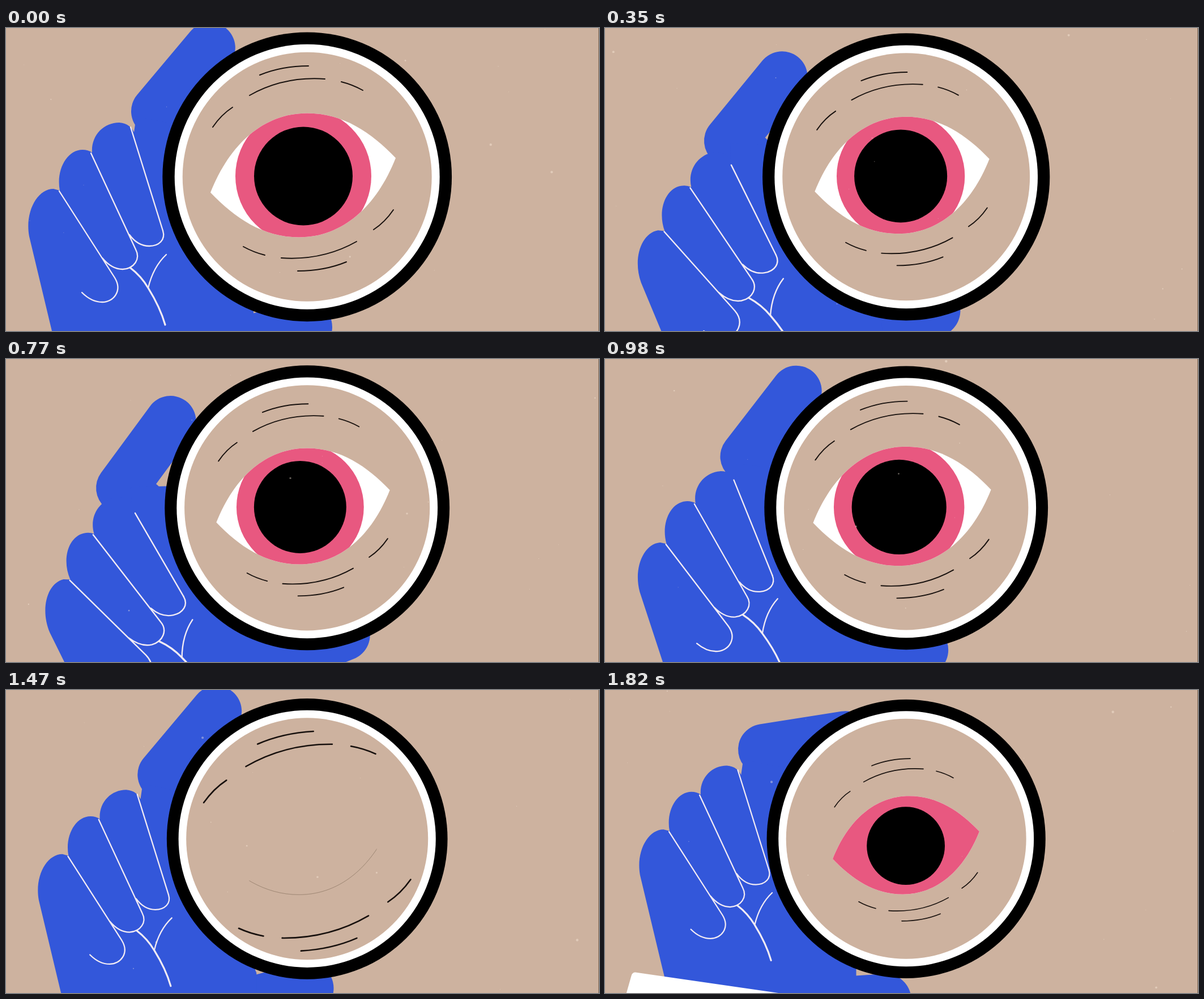
An HTML page with a canvas for the animation above (1890 ms loop, 1047 by 535 pixels).

```html
<!DOCTYPE html>
<html lang="en">
<head>
<meta charset="utf-8">
<title>Eye behind a magnifying glass</title>
<style>
  html, body { margin: 0; width: 100%; height: 100%; overflow: hidden; background: #cdb29f; }
  canvas { display: block; }
</style>
</head>
<body>
<canvas id="stage" width="1047" height="535"></canvas>
<script>
const ctx = document.getElementById('stage').getContext('2d');
const LOOP = 1890, STEP = 70, LAST = LOOP - STEP;
const TAN = '#cdb29f', BLUE = '#3357da', PINK = '#e85880', CREASE = '#f3ecf4';

const PALM = new Path2D(`M81 535L41 368C33 325 55 284 84 284L95 287C88 250 108 215 135 215
  Q145 215 152 220C150 190 172 167 200 167C215 168 222 176 226 184L230 156L300 170L437 500V800H146Z`);
const SLEEVE = new Path2D('M0 640L25 552Q27 545 34 546L400 599V800H0Z');
const FINGER_LINES = new Path2D(`M94 288L192 441C206 464 190 484 170 484C155 484 144 477 134 467
  M150 221L229 391C238 408 226 425 206 426C192 426 180 418 170 406
  M277 358C282 374 270 385 253 385C238 385 226 376 218 365
  M251 459C256 438 266 416 283 400`);
const PALM_LINE = new Path2D('M219 423C232 433 244 447 251 459C264 480 275 503 281 524');

// Eye and wrinkles look the same after half a turn, so only the upper half is given.
const LID = [[-163.5, 30.5], [-129.5, -55.5], [-69.5, -109.5], [7.5, -109.5],
  [70.5, -109.5], [120.5, -75.5], [163.5, -30.5]];
const WRINKLES = new Path2D(`M-76.5-165Q-37.5-181 9.5-181M-94.5-129Q-34.5-163 38.5-158
  M67.5-153Q87.5-148 105.5-138M-159.5-73Q-144.5-95-124.5-108`);

const mix = (a, b, k) => a + (b - a) * k;
const progress = (t, from, to) => Math.min(1, Math.max(0, (t - from) / (to - from)));
const ease = (t, from, to) => { const k = progress(t, from, to); return k * k * (3 - 2 * k); };
const arch = (t, from, to) => Math.max(0, Math.sin(Math.PI * progress(t, from, to)));
const radians = degrees => degrees * Math.PI / 180;

function rotated(x, y, degrees) {
  const c = Math.cos(radians(degrees)), s = Math.sin(radians(degrees));
  return [x * c - y * s, x * s + y * c];
}

function disc(x, y, r, color) {
  ctx.fillStyle = color;
  ctx.beginPath();
  ctx.arc(x, y, r, 0, 2 * Math.PI);
  ctx.fill();
}

function polyline(points, width, color) {
  ctx.strokeStyle = color;
  ctx.lineWidth = width;
  ctx.beginPath();
  points.forEach(p => ctx.lineTo(...p));
  ctx.stroke();
}

// The hand dips and turns around its palm, then lifts at the end.
function drawHand(t, zoom) {
  const turn = 15.6 * arch(t, 0, 1220) ** 2.2;
  const lift = ease(t, 1540, LAST);
  const x = 232 + 14 * t / LAST + 3.1 * turn;
  const y = 400 + 3 * t / LAST + 5.5 * turn - 45 * lift;
  const scale = zoom * (1 + .004 * turn);
  ctx.lineCap = ctx.lineJoin = 'round';

  const [kx, ky] = rotated(34, -253, -1.9 * turn);
  const knuckle = [x + kx, y + ky];
  const lean = 50 - 10 * arch(t, 0, 420) ** 2 + 4 * arch(t, 0, 1220) - 41 * lift;
  const [dx, dy] = rotated(146, 0, -lean);
  const tip = [knuckle[0] + dx, knuckle[1] + dy];
  const base = [knuckle[0] + 35, knuckle[1] + 30];
  polyline([tip, knuckle, base], 90, BLUE);

  const [tx, ty] = rotated(298 * zoom, 128 * zoom, 14 * lift - 1.6 * turn);
  polyline([[437, 551], [x + tx, y + ty]], 92, BLUE);

  ctx.save();
  ctx.translate(x, y);
  ctx.rotate(radians(-turn));
  ctx.scale(scale, scale);
  ctx.translate(-232, -400);
  ctx.fillStyle = BLUE;
  ctx.fill(PALM);
  const trim = .011 * turn;
  polyline([[mix(220, 277, trim), mix(175, 358, trim)], [277, 358]], 2.3, CREASE);
  ctx.stroke(FINGER_LINES);
  ctx.lineWidth = 3.2;
  ctx.stroke(PALM_LINE);
  ctx.fillStyle = '#fff';
  ctx.fill(SLEEVE);
  ctx.restore();
}

function drawWrinkles(shut) {
  ctx.save();
  ctx.translate(7.5 * shut, mix(-12, 7, shut));
  ctx.transform(mix(1, 1.18, shut), -.065 * shut, 0, mix(1, 1.1, shut), 0, 0);
  ctx.strokeStyle = '#17100d';
  ctx.lineWidth = mix(2, 2.4, shut);
  ctx.stroke(WRINKLES);
  ctx.rotate(Math.PI);
  ctx.stroke(WRINKLES);
  ctx.restore();
}

// The upper lid closes onto the lower one.
function lidPath(shut) {
  const lower = LID.map(([x, y]) => [-x, -y - 5 * shut]);
  const upper = LID.map(([x, y], i) => [mix(x, lower[6 - i][0], shut), mix(y, lower[6 - i][1], shut)]);
  const path = new Path2D();
  path.moveTo(...upper[0]);
  for (const p of [upper, lower]) {
    path.bezierCurveTo(...p[1], ...p[2], ...p[3]);
    path.bezierCurveTo(...p[4], ...p[5], ...p[6]);
  }
  return path;
}

function drawEye(t, zoom) {
  const reopen = ease(t, 1470, LAST);
  const shut = ease(t, 1260, 1470) - reopen;
  const scale = zoom * (1 - .06 * arch(t, 0, 1100)) * (1 - .178 * reopen);
  const gaze = .5 - 6 * ease(t, 210, 490) + 10 * ease(t, 980, 1260) - 5 * reopen;

  ctx.save();
  ctx.translate(524.5 + 7 * reopen, 260 + 14 * reopen);
  ctx.scale(scale, scale);
  drawWrinkles(shut);
  const lids = lidPath(shut);
  if (shut < 1) {
    ctx.clip(lids);
    ctx.fillStyle = '#fff';
    ctx.fillRect(-200, -150, 400, 300);
    disc(gaze, 1.5, mix(120, 170, reopen), PINK);
    disc(gaze, 1.5, 87, '#000');
  } else {
    ctx.beginPath();
    ctx.rect(-98, 0, 232, 150);
    ctx.clip();
    ctx.strokeStyle = '#86705f';
    ctx.lineWidth = .4;
    ctx.stroke(lids);
  }
  ctx.restore();
}

// Film dust, new on every step
function drawDust(step) {
  let seed = step * 7919 + 17;
  const random = () => (seed = (seed * 16807) % 2147483647) / 2147483647;
  for (let i = 0; i < 5; i++) random();
  for (let i = 0; i < 18; i++) {
    disc(random() * 1047, random() * 535, .5 + 2 * random() ** 4, 'rgba(255,240,225,.4)');
  }
}

function draw(now) {
  const step = Math.floor((now % LOOP) / STEP), t = step * STEP;
  const zoom = 1 - .0365 * t / LAST;
  ctx.fillStyle = TAN;
  ctx.fillRect(0, 0, 1047, 535);
  drawHand(t, zoom);
  disc(531.7, 262.8, 255.4 * zoom, '#000');
  disc(531.7, 262.8, 234 * zoom, '#fff');
  disc(531.7, 262.8, 220 * zoom, TAN);
  drawEye(t, zoom);
  drawDust(step);
  ctx.fillStyle = '#7a6552';
  ctx.fillRect(1046, 0, 1, 535);
}

const start = performance.now();
function tick() {
  draw(performance.now() - start);
  requestAnimationFrame(tick);
}
tick();
</script>
</body>
</html>
```
